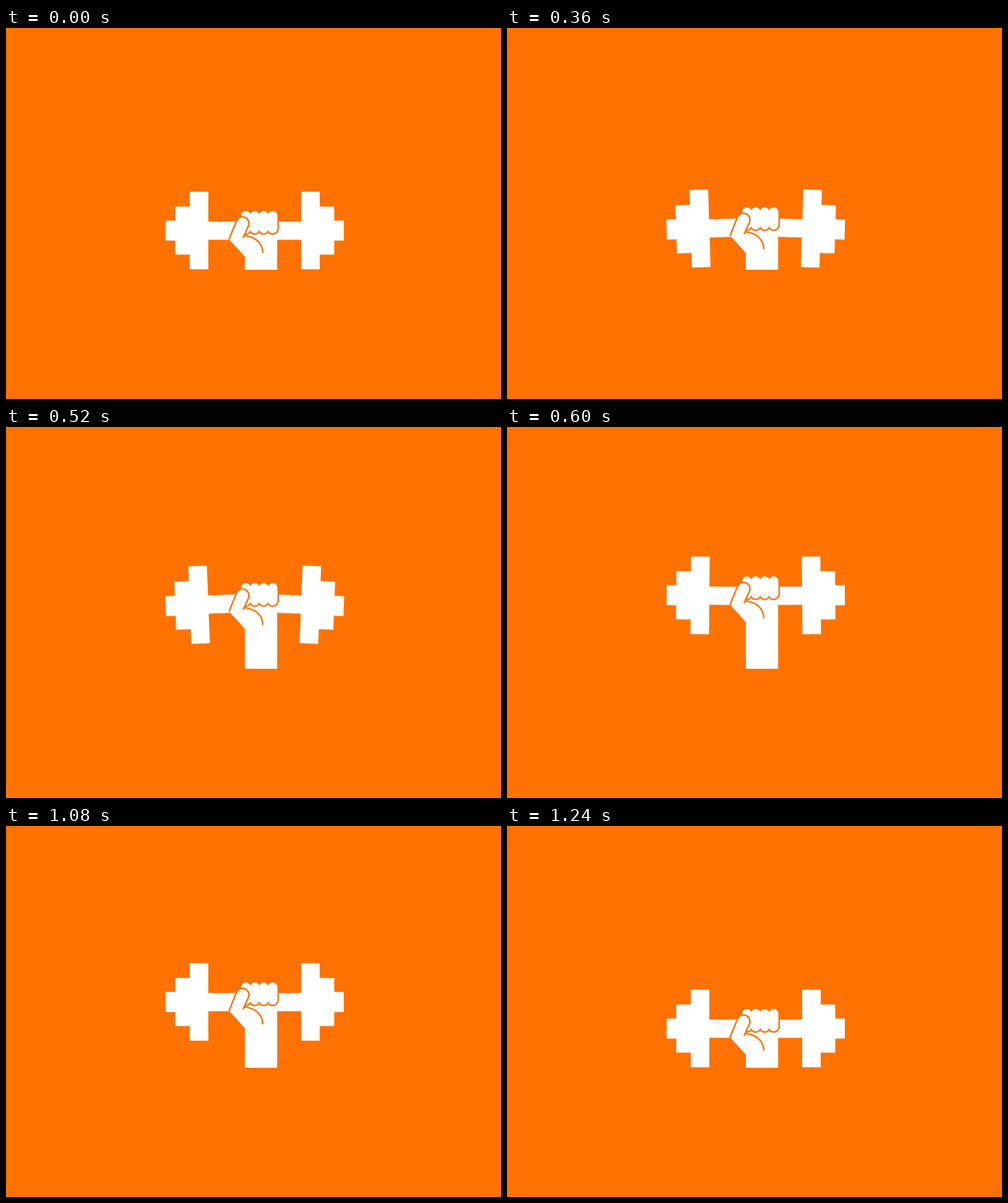
These frames come from a looping animation (800 by 600 pixels, 1280 ms). An HTML page:

```html
<!DOCTYPE html>
<html lang="en">
<head>
<meta charset="utf-8">
<title>Dumbbell lift</title>
<style>
  html, body { margin: 0; width: 100%; height: 100%; overflow: hidden; background: #ff7202; }
  svg { display: block; width: 100%; height: 100%; }
  .half { transform-origin: 402px 328px; }
  .white { fill: #fff; }
  .line { fill: none; stroke: #ff7202; stroke-width: 2.5; stroke-linejoin: round; }
  .gap { fill: #ff7202; stroke: #ff7202; stroke-width: 5; }
</style>
</head>
<body>
<svg viewBox="0 0 800 600">
  <defs>
    <clipPath id="ground"><rect width="800" height="390.6"/></clipPath>
    <path id="weight" d="M258 311.6H273.5V288.8H297V264.8H327V313H402V342.5H327V390.2H297V366.5H273.5V343.8H258Z"/>
    <g id="fingers">
      <rect x="380" y="296" width="15.2" height="36" rx="7.6"/>
      <rect x="394.4" y="296" width="15.2" height="36" rx="7.6"/>
      <rect x="408.9" y="296" width="15.2" height="36" rx="7.6"/>
      <rect x="423.4" y="296" width="15.2" height="36" rx="7.6"/>
    </g>
  </defs>

  <g class="lift white">
    <g class="half"><use href="#weight"/></g>
    <g transform="translate(804) scale(-1 1)"><g class="half"><use href="#weight"/></g></g>
  </g>

  <g clip-path="url(#ground)">
    <g class="lift">
      <path class="white" d="M361 342L386 370V470H438.2V325H380Z"/>
      <use href="#fingers" class="gap"/>
      <use href="#fingers" class="white"/>
      <path class="white" d="M361 342V340.5L372.6 311.7A10.5 10.5 0 0 1 392 319.7L383 339.5L380 350H368Z"/>
      <path class="line" d="M361 342.5V340.5L372.6 311.7A10.5 10.5 0 0 1 392 319.7L383 339.5"/>
      <path class="line" d="M385 335.8C402 337 415 347.5 415 363.8"/>
    </g>
  </g>
</svg>
<script>
  const STEP = 40, STEPS = 32;
  const TOP = 47.6;
  const RISE_FROM = 7, FALL_FROM = 26, FALL_STEPS = 5;

  // Height of the fist and droop of the bar in degrees while it goes up.
  const rise = [
    [0.4, 0.1], [2, 0.7], [6, 1.8], [13, 2.9], [23, 3.5], [34, 3.2], [43.5, 2.2],
    [50.5, 0.8], [54.4, -0.5], [55.2, -1], [53.5, -0.8], [51, -0.4], [48.7, -0.15], [TOP, 0]
  ];

  function pose(step) {
    if (step < RISE_FROM) return [0, 0];
    if (step < FALL_FROM) return rise[Math.min(step - RISE_FROM, rise.length - 1)];
    const u = Math.min((step - FALL_FROM) / FALL_STEPS, 1);
    return [TOP * (1 + Math.cos(Math.PI * u)) / 2, 0];
  }

  function play(selector, transformOf) {
    const frames = Array.from({ length: STEPS + 1 }, (_, i) => ({
      offset: i / STEPS,
      easing: "steps(1, end)",
      transform: transformOf(...pose(i % STEPS))
    }));
    document.querySelectorAll(selector).forEach(el =>
      el.animate(frames, { duration: STEP * STEPS, iterations: Infinity }));
  }

  play(".lift", height => `translateY(${-height}px)`);
  play(".half", (_, droop) => `rotate(${-droop}deg)`);
</script>
</body>
</html>
```
